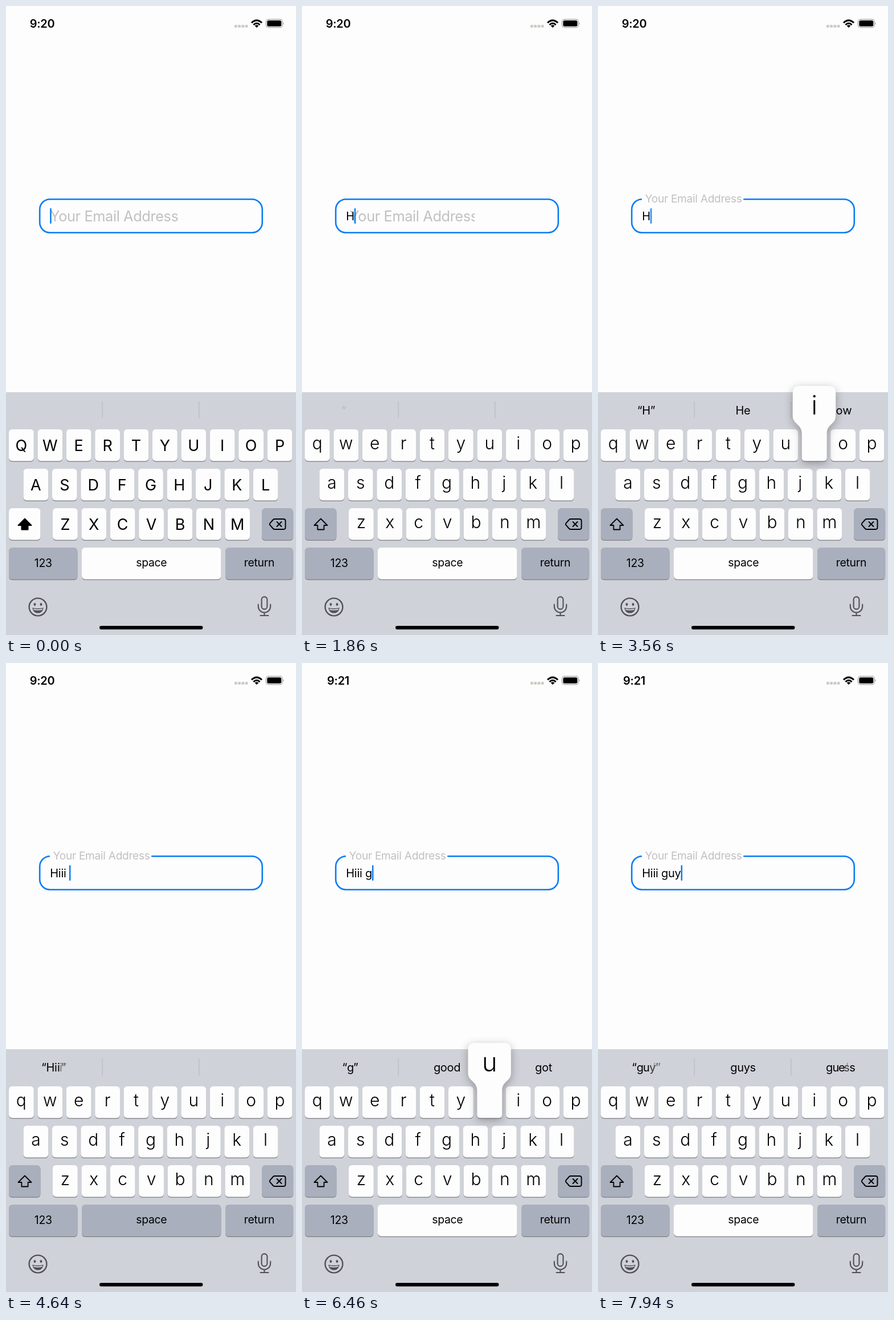
Recreate the animation shown at these times as an HTML page with a canvas. Size 509 by 1101 pixels, loop 8 s.

```html
<!DOCTYPE html>
<html lang="en">
<head>
<meta charset="utf-8">
<title>Floating label field</title>
<style>
html, body { margin: 0; width: 100%; height: 100%; overflow: hidden; background: #fdfdfd; }
canvas { display: block; }
</style>
</head>
<body>
<canvas id="stage" width="509" height="1101"></canvas>
<script>
const ctx = document.getElementById('stage').getContext('2d');
const LOOP = 8000;
const PAPER = '#fdfdfd', BLUE = '#087cf4', BOARD = '#d0d2d9', GREY = '#a9afbd', ICON = '#505257';
const PITCH = 50.4, KEY_W = 43.8, KEY_H = 55.5;
const ROWS = [['qwertyuiop', 5, 741], ['asdfghjkl', 30.5, 810], ['zxcvbnm', 82, 879]];

// key, press, release, text insertion, text afterwards
const PRESSES = [
  ['h', 1560, 1840, 1840, 'H'],
  ['i', 3520, 3660, 3660, 'Hi'],
  ['i', 3900, 4030, 4030, 'Hii'],
  ['i', 4230, 4340, 4340, 'Hiii'],
  ['space', 4500, 4740, 4590, 'Hiii '],
  ['g', 5860, 5980, 5980, 'Hiii g'],
  ['u', 6420, 6530, 6530, 'Hiii gu'],
  ['y', 7680, 7790, 7790, 'Hiii guy']
];

const HINTS = [
  [-1000, '', '', ''],
  [1850, '“H”', 'He', 'How'],
  [3680, '“Hi”', '', ''],
  [4050, '“Hii”', '', ''],
  [4500, '“Hiii”', '', ''],
  [4900, '', '', ''],
  [5990, '“g”', 'good', 'got'],
  [6550, '“gu”', 'guys', 'guess'],
  [7800, '“guy”', 'guys', 'gue’s']
];

const clamp = v => Math.max(0, Math.min(1, v));
const lerp = (a, b, p) => a + (b - a) * p;
const ease = p => p < .5 ? 4 * p ** 3 : 1 - (2 - 2 * p) ** 3 / 2;

function font(size, weight = 400, spacing = 0) {
  ctx.font = `${weight} ${size}px Inter, Roboto, sans-serif`;
  ctx.letterSpacing = spacing + 'px';
}

function text(s, x, y, color = '#000', align = 'center') {
  ctx.fillStyle = color;
  ctx.textAlign = align;
  ctx.fillText(s, x, y);
}

function box(x, y, w, h, r, color) {
  ctx.fillStyle = color;
  ctx.beginPath();
  ctx.roundRect(x, y, w, h, r);
  ctx.fill();
}

function line(d, width, color = '#000') {
  ctx.strokeStyle = color;
  ctx.lineWidth = width;
  ctx.stroke(new Path2D(d));
}

function shape(d, color = '#000') {
  ctx.fillStyle = color;
  ctx.fill(new Path2D(d));
}

function keycap(x, y, w, color) {
  box(x, y + 1.4, w, KEY_H, 6, '#898b90');
  box(x, y, w, KEY_H, 6, color);
}

function statusBar(t) {
  font(20, 600, -.3);
  text(t < 5350 ? '9:20' : '9:21', 63.5, 37.7);
  for (let i = 0; i < 4; i++) box(401 + i * 6.2, 33, 4.8, 4.8, 1, '#cbcbc4');
  ctx.lineCap = 'butt';
  line('M431 29.3 Q440 20.8 449 29.3', 3);
  line('M434.4 32.9 Q440 27.6 445.6 32.9', 2.8);
  shape('M436.6 34.5 Q440 31.8 443.4 34.5 L440 38 Z');
  ctx.strokeStyle = '#a0a0a0';
  ctx.lineWidth = 1.2;
  ctx.beginPath();
  ctx.roundRect(456.4, 23.4, 28.8, 14.2, 4);
  ctx.stroke();
  box(458.3, 25.2, 25, 10.6, 2.5, '#000');
  shape('M486.5 28 Q488.8 30.5 486.5 33 Z', '#a0a0a0');
}

// The label shrinks onto the border, slightly past its place, then settles.
function labelProgress(t) {
  if (t < 2560) return 1.04 * ease(clamp((t - 1840) / 400));
  return lerp(1.04, 1, ease(clamp((t - 2560) / 240)));
}

function field(t) {
  ctx.strokeStyle = BLUE;
  ctx.lineWidth = 2.6;
  ctx.beginPath();
  ctx.roundRect(59.2, 338.2, 390.6, 58.6, 18);
  ctx.stroke();

  const p = labelProgress(t);
  const scale = 1 - .245 * p, y = 368 - 30.5 * p, w = 226 - 47.5 * p;
  const pad = t < 1840 ? 0 : 6.2 - p;
  ctx.save();
  ctx.beginPath();
  ctx.rect(77, y - 17 * scale, w, 34 * scale);
  ctx.clip();
  ctx.fillStyle = PAPER;
  ctx.fill();
  ctx.translate(77.3 + pad, y + 9.2 * scale);
  ctx.scale(scale, scale);
  font(25.4, 400, -.42);
  text('Your Email Address', 0, 0, '#c1c1c4', 'left');
  ctx.restore();

  const last = PRESSES.filter(k => t >= k[3]).pop();
  const typed = last ? last[4] : '';
  font(20, 400, -.25);
  text(typed, 77.2, 375, '#000', 'left');
  caret(t - (last ? last[3] : -180), 77.2 + ctx.measureText(typed).width);
}

function caret(age, x) {
  const u = age < 700 ? 999 : (age - 700) % 1000;
  ctx.globalAlpha = u < 350 ? 1 - clamp(u / 160) : clamp((u - 350) / 150);
  box(x, 354, 2.5, 27, 1, BLUE);
  ctx.globalAlpha = 1;
}

// Equal letters slide to their new place, others cross-fade from left to right.
function hints(t) {
  const k = HINTS.findLastIndex(h => t >= h[0]);
  const now = HINTS[k], before = HINTS[Math.max(0, k - 1)];
  font(20, 400, -.35);
  [84.5, 254.5, 424].forEach((center, c) => {
    const a = before[c + 1], b = now[c + 1];
    const place = (s, i) =>
      center - ctx.measureText(s).width / 2 + ctx.measureText(s.slice(0, i)).width;
    const glyph = (ch, x, alpha) => {
      ctx.globalAlpha = alpha;
      text(ch, x, 714.5, '#000', 'left');
    };
    for (let i = 0; i < Math.max(a.length, b.length); i++) {
      const p = clamp((t - now[0] - 20 * c - 25 * i) / 90);
      if (a[i] === b[i]) glyph(b[i], lerp(place(a, i), place(b, i), p), 1);
      else {
        if (a[i]) glyph(a[i], place(a, i), 1 - p);
        if (b[i]) glyph(b[i], place(b, i), p);
      }
    }
  });
  ctx.globalAlpha = 1;
}

function bubble(x, y, ch, upper) {
  const l = x - 16, r = x + KEY_W + 15.6, e = x + KEY_W, top = y - 76, b = y + KEY_H;
  ctx.save();
  ctx.shadowColor = 'rgba(0,0,0,.3)';
  ctx.shadowBlur = 16;
  ctx.shadowOffsetY = 4;
  shape(`M${l + 12} ${top} H${r - 12} Q${r} ${top} ${r} ${top + 12} V${y - 24}
    C${r} ${y - 8} ${e} ${y - 10} ${e} ${y + 8} V${b - 6} Q${e} ${b} ${e - 6} ${b}
    H${x + 6} Q${x} ${b} ${x} ${b - 6} V${y + 8}
    C${x} ${y - 10} ${l} ${y - 8} ${l} ${y - 24} V${top + 12} Q${l} ${top} ${l + 12} ${top} Z`, PAPER);
  ctx.restore();
  box(x + 2, b, KEY_W - 4, 1.2, 0, '#898b90');
  font(upper ? 43 : 45, 300);
  text(upper ? ch.toUpperCase() : ch, x + KEY_W / 2, y - 26);
}

function icons(upper) {
  ctx.lineJoin = ctx.lineCap = 'round';
  const arrow = 'M33 897.5 L44.5 909 H38.6 V916.5 H27.4 V909 H21.5 Z';
  if (upper) shape(arrow);
  line(arrow, 1.8);

  line('M471.5 898 H487 Q490.5 898 490.5 901.5 V912.5 Q490.5 916 487 916 H471.5 Q470 916 469 915 L463.2 908.4 Q462.2 907 463.2 905.6 L469 899 Q470 898 471.5 898 Z M475.5 903 L483.5 911 M483.5 903 L475.5 911', 1.9);

  ctx.strokeStyle = ICON;
  ctx.lineWidth = 2.4;
  ctx.beginPath();
  ctx.arc(56, 1052, 15.4, 0, 7);
  ctx.stroke();
  for (const x of [50.5, 61.5]) {
    ctx.fillStyle = ICON;
    ctx.beginPath();
    ctx.ellipse(x, 1047.5, 1.9, 2.4, 0, 0, 7);
    ctx.fill();
  }
  shape('M46.3 1053.2 Q56 1056 65.7 1053.2 Q64.5 1062.8 56 1062.8 Q47.5 1062.8 46.3 1053.2 Z', ICON);
  line('M49 1056 Q56 1058 63 1056', 2, BOARD);

  line('M448.6 1039 a4.9 4.9 0 0 1 9.8 0 V1051 a4.9 4.9 0 0 1 -9.8 0 Z M442.8 1047.5 V1051 a10.7 10.7 0 0 0 21.4 0 V1047.5 M453.5 1061.8 V1067 M446.5 1067 H460.5', 2.1, ICON);
}

function keyboard(t) {
  const upper = t < 1840;
  const press = PRESSES.find(k => t >= k[1] && t < k[2]);
  const down = press && press[0];
  box(0, 676, 509, 425, 0, BOARD);
  for (const x of [168.4, 338]) box(x, 692, 1.3, 30, 0, '#bbbdc3');
  hints(t);

  let popup;
  for (const [letters, x0, y] of ROWS) {
    [...letters].forEach((ch, i) => {
      const x = x0 + i * PITCH;
      if (ch === down) popup = [x, y, ch, upper];
      keycap(x, y, KEY_W, PAPER);
      font(upper ? 27 : 30, upper ? 400 : 300);
      text(upper ? ch.toUpperCase() : ch, x + KEY_W / 2, y + (upper ? 38 : 35));
    });
  }
  keycap(5, 879, 55.5, upper ? PAPER : GREY);
  keycap(449, 879, 55.2, GREY);
  keycap(5, 948, 120.5, GREY);
  keycap(133, 948, 244.5, down === 'space' ? GREY : PAPER);
  keycap(385, 948, 119.2, GREY);
  font(19.4, 400, -.3);
  text('123', 65.2, 982);
  text('space', 255.3, 980.5);
  text('return', 444.5, 980.5);
  icons(upper);
  box(164, 1085, 181.5, 6.2, 3.1, '#000');
  if (popup) bubble(...popup);
}

function frame(now) {
  const t = now % LOOP;
  box(0, 0, 509, 1101, 0, PAPER);
  statusBar(t);
  field(t);
  keyboard(t);
  requestAnimationFrame(() => frame(performance.now() - start));
}

const start = performance.now();
frame(0);
</script>
</body>
</html>
```
